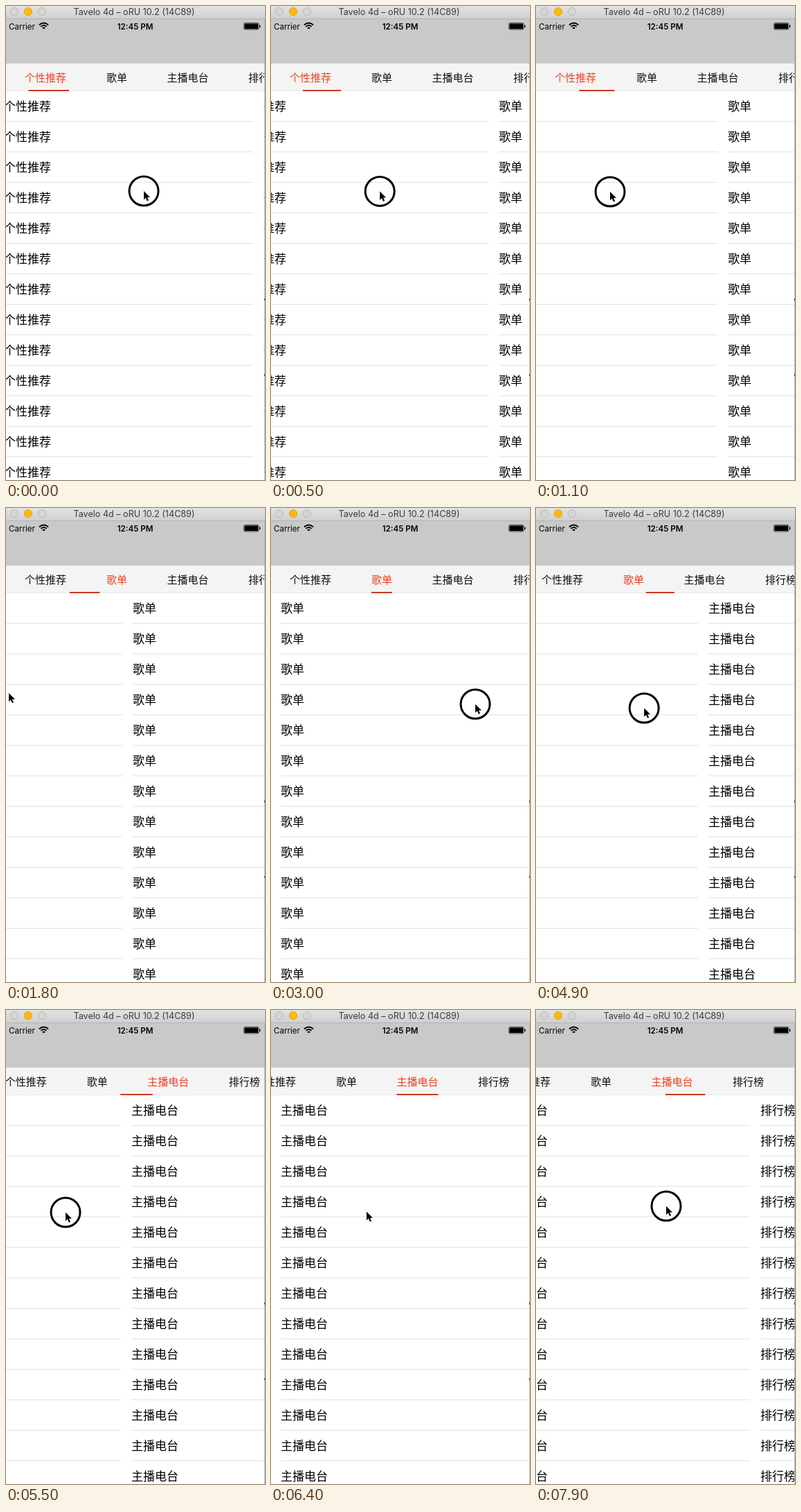
An HTML page with a canvas for the animation above (8000 ms loop, 374 by 684 pixels).

```html
<!DOCTYPE html>
<html lang="zh-CN">
<head>
<meta charset="utf-8">
<style>
html, body { margin: 0; width: 374px; height: 684px; overflow: hidden; background: #fff; }
canvas { display: block; }
</style>
</head>
<body>
<canvas id="stage" width="374" height="684"></canvas>
<script>
const W = 374, H = 684, PAGE = 375, LOOP = 8000, STEP = 100;
const ctx = document.getElementById('stage').getContext('2d');
const CJK = '"Noto Sans CJK SC", "Noto Sans CJK", sans-serif';
const LATIN = 'Inter, "Liberation Sans", sans-serif';

const tabs = [
  { name: '个性推荐', x: 27, w: 60 },
  { name: '歌单', x: 145, w: 30 },
  { name: '主播电台', x: 232.5, w: 60 },
  { name: '排行榜', x: 350, w: 45 },
];
const tabScroll = [0, 0, 51, 137];

// [time, values..., easing into this key]
const easeOut = k => 1 - (1 - k) ** 3;
const scrollKeys = [
  [0, [17]], [1100, [112]], [1800, [206]], [2500, [375], easeOut],
  [3100, [375]], [3300, [379]], [3500, [379]], [4200, [436]], [5500, [583]],
  [5700, [606]], [6400, [750], easeOut], [7100, [750]], [7300, [760]],
  [7500, [760]], [7900, [815]],
];
const smooth = k => k * k * (3 - 2 * k);
const cursorKeys = [
  [0, [199, 267]], [1100, [107, 268]], [1800, [4, 267]], [2600, [264, 232], smooth],
  [2700, [264, 232]], [3000, [295, 283]], [3100, [295, 283]], [3300, [292, 284]],
  [3500, [292, 284]], [4200, [238, 285]], [5500, [86, 292]], [5700, [62, 292]],
  [6400, [138, 291], smooth], [7100, [253, 283], smooth], [7300, [243, 283]],
  [7500, [243, 283]], [7900, [188, 283]],
];
const presses = [[0, 1800], [3000, 5700], [7100, LOOP]];

const mix = (a, b, k) => a + (b - a) * k;

function sample(keys, t) {
  const i = keys.findIndex(key => key[0] > t);
  if (i < 0) return keys[keys.length - 1][1];
  const [t0, from] = keys[i - 1];
  const [t1, to, ease = k => k] = keys[i];
  const k = ease((t - t0) / (t1 - t0));
  return from.map((v, j) => mix(v, to[j], k));
}

function rect(x, y, w, h, color) {
  ctx.fillStyle = color;
  ctx.fillRect(x, y, w, h);
}

function text(str, x, y, font, color = '#000', align = 'left') {
  ctx.font = font;
  ctx.fillStyle = color;
  ctx.textAlign = align;
  ctx.fillText(str, x, y);
}

function drawLists(scroll) {
  tabs.forEach(({ name }, i) => {
    const x = Math.round(i * PAGE - scroll) - 1;
    if (x > W || x < -PAGE) return;
    for (let y = 123; y < H; y += 44) {
      text(name, x + 15, y + 28, `17px ${CJK}`);
      rect(x + 15, y + 43, PAGE - 15, 1, '#e2e2e2');
    }
  });
}

function drawTabs(progress) {
  const i = Math.min(Math.floor(progress), tabs.length - 2);
  const k = progress - i;
  const shift = mix(tabScroll[i], tabScroll[i + 1], k);
  const a = tabs[i], b = tabs[i + 1];
  rect(0, 83, W, 40, '#f4f4f4');
  rect(0, 122, W, 1, '#e9e9e9');
  tabs.forEach((tab, n) => {
    const color = n === Math.round(progress) ? '#ee4023' : '#111';
    text(tab.name, tab.x - shift, 108.7, `15px ${CJK}`, color);
  });
  const left = mix(a.x, b.x, k);
  const right = mix(a.x + a.w, b.x + b.w, k);
  rect(left - shift, 121, right - left, 2, '#c93820');
}

function drawWifi() {
  ctx.save();
  ctx.beginPath();
  ctx.moveTo(54.5, 34);
  ctx.lineTo(46, 25.5);
  ctx.lineTo(46, 20);
  ctx.lineTo(63, 20);
  ctx.lineTo(63, 25.5);
  ctx.clip();
  ctx.strokeStyle = '#000';
  ctx.lineWidth = 1.8;
  for (const r of [1.5, 5, 8.5]) {
    ctx.beginPath();
    ctx.arc(54.5, 33, r, Math.PI, 0);
    ctx.stroke();
  }
  ctx.restore();
}

function drawBattery() {
  ctx.strokeStyle = '#000';
  ctx.lineWidth = 0.7;
  ctx.beginPath();
  ctx.roundRect(343.5, 24.5, 21.5, 9.5, 2);
  ctx.stroke();
  rect(344.5, 25.5, 19.5, 7.5, '#000');
  rect(366, 27.5, 1.3, 3.5, '#000');
}

function drawHeader() {
  rect(0, 18, W, 65, '#c9c9c9');
  const bar = ctx.createLinearGradient(0, 0, 0, 18);
  bar.addColorStop(0, '#e2e2e2');
  bar.addColorStop(1, '#d0d0d0');
  rect(0, 0, W, 18, bar);
  rect(0, 18, W, 1, '#b4b4b4');
  [['#d5d5d5', '#b9b9b9'], ['#fdb90d', '#e3a21c'], ['#d5d5d5', '#b9b9b9']].forEach(([fill, edge], i) => {
    ctx.beginPath();
    ctx.arc(12 + i * 20, 8, 5.6, 0, 7);
    ctx.fillStyle = fill;
    ctx.fill();
    ctx.strokeStyle = edge;
    ctx.lineWidth = 1;
    ctx.stroke();
  });
  text('Tavelo 4d – oRU 10.2 (14C89)', 185, 13, `12.6px ${LATIN}`, '#3b3b3b', 'center');
  text('Carrier', 4, 33.5, `11.6px ${LATIN}`);
  text('12:45 PM', 186.5, 33.5, `600 11.6px ${LATIN}`, '#000', 'center');
  drawWifi();
  drawBattery();
}

function drawCursor([x, y], pressed) {
  if (pressed) {
    ctx.beginPath();
    ctx.arc(x, y, 21, 0, 7);
    ctx.strokeStyle = '#000';
    ctx.lineWidth = 3;
    ctx.stroke();
  }
  ctx.save();
  ctx.translate(x, y);
  const arrow = new Path2D('M0 0V12.5L2.8 9.8L4.8 14.5L7 13.5L5 9H9Z');
  ctx.lineJoin = 'round';
  ctx.lineWidth = 2;
  ctx.strokeStyle = '#fff';
  ctx.stroke(arrow);
  ctx.fillStyle = '#000';
  ctx.fill(arrow);
  ctx.restore();
}

function draw(t) {
  const [scroll] = sample(scrollKeys, t);
  rect(0, 0, W, H, '#fff');
  drawLists(scroll);
  drawTabs(scroll / PAGE);
  drawHeader();
  rect(373, 19, 1, H, '#b2b2b2');
  for (const y of [422, 531]) rect(373, y, 1, 3, '#222');
  drawCursor(sample(cursorKeys, t), presses.some(([from, to]) => t >= from && t < to));
}

const start = performance.now();
function frame() {
  const t = (performance.now() - start) % LOOP;
  draw(Math.floor(t / STEP) * STEP);
  requestAnimationFrame(frame);
}
frame();
</script>
</body>
</html>
```
